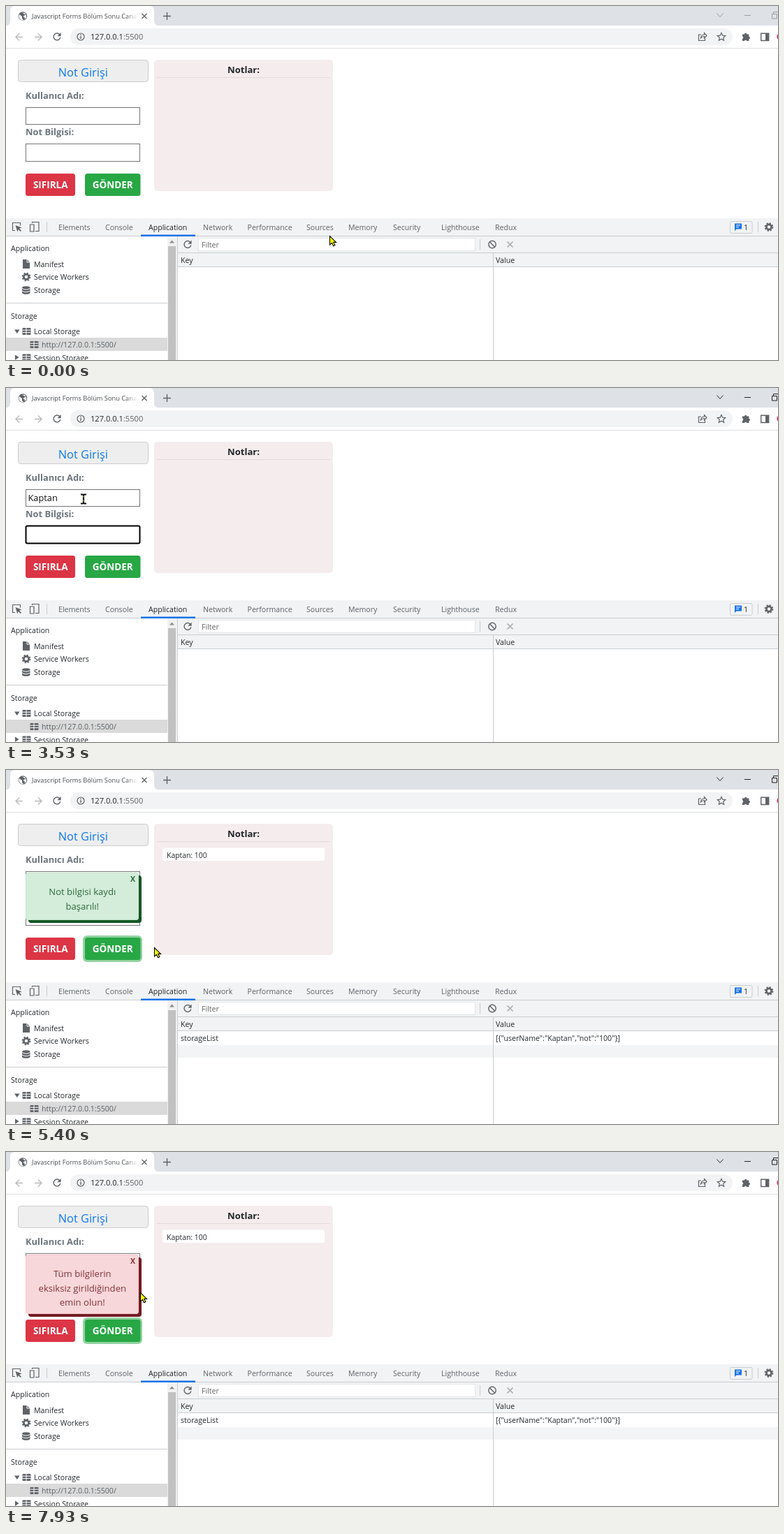
An HTML page that plays this animation: 1105x507 px, repeating every 8000 ms.

```html
<!DOCTYPE html>
<html lang="tr">
<head>
<meta charset="utf-8">
<style>
html, body { margin: 0; width: 100%; height: 100%; overflow: hidden; background: #fff }
svg { display: block; font-family: "Open Sans", "Noto Sans", sans-serif; font-size: 10.6px }
text { fill: #24282c; white-space: pre }
.mid { text-anchor: middle }
.bold { font-weight: 700 }
.label { font-size: 12.9px; fill: #6c757d }
.button { font-size: 13.5px; fill: #fff }
.typed { font-size: 12.8px; fill: #111 }
.line { fill: none; stroke: #5f6368; stroke-width: 1.4 }
.rule { fill: none; stroke: #cacdd1 }
.bar { fill: #f1f3f4 }
.icon { fill: #5f6368 }
.alert text { font-size: 13.1px; fill: inherit; fill-opacity: .88 }
</style>
</head>
<body>
<svg width="1105" height="507" viewBox="0 0 1105 507">
<defs>
  <g id="gear"><circle r="3.6" fill="none" stroke="#5f6368" stroke-width="2.6"/><circle r="5.4" fill="none" stroke="#5f6368" stroke-width="2" stroke-dasharray="2.2 2.04"/></g>
  <g id="reload"><path class="line" stroke-width="1.7" d="M3.6-3.4A4.9 4.9 0 1 0 4.8 1"/><path class="icon" d="M5.6-6v5.2H.4z"/></g>
  <g id="grid" class="icon"><rect width="12" height="10" rx="1"/><path d="M0 3.2h12M0 6.6h12M5.5 0v10" stroke="#fff"/></g>
</defs>

<!-- browser frame -->
<rect width="1105" height="28" fill="#dee1e6"/>
<path d="M0 28.500Q6 28 6 21V7Q6 0 13 0H205Q212 0 212 7V21Q212 28 219 28.500z" fill="#fff"/>
<circle class="icon" cx="24" cy="14.500" r="6.200"/>
<path d="M19 12l4 3v3l2 2-1 .6q-5-1-5.600-6zM23 9.500l4 .5 1.800 3-3 .5-1 2 2.500 1.500-1 2q4-2 2.500-6z" fill="#fff"/>
<linearGradient id="fade" gradientUnits="userSpaceOnUse" x1="172" x2="188" y1="0" y2="0"><stop stop-color="#45494d"/><stop offset="1" stop-color="#45494d" stop-opacity="0"/></linearGradient>
<text x="37" y="18" font-size="9.250" style="fill:url(#fade)">Javascript Forms Bölüm Sonu Canav</text>
<path class="line" stroke="#3c4043" d="M194.500 11l7 7m0-7l-7 7M225 14.500h11m-5.500-5.500v11"/>
<g id="windowKeys" fill="none"><path d="M1017.500 10.500l4.500 5 4.500-5M1057 13.500h9M1096.500 11.500h7v6.500h-7zM1098.500 11v-2.500h8v7"/></g>
<path class="line" style="stroke:#babcbe" d="M24 44.500H14m5-5l-5 5 5 5M41 44.500h10m-5-5l5 5-5 5"/>
<use href="#reload" x="73" y="44"/>
<rect class="bar" x="92" y="32" width="948" height="24" rx="12"/>
<circle class="line" cx="107" cy="44" r="5" style="stroke-width:1.200"/><path class="line" d="M107 43v4m0-6.500v1.400"/>
<text x="121" y="48" font-size="11.100">127.0.0.1<tspan fill="#5f6368">:5500</tspan></text>
<path class="line" style="stroke-width:1.200" d="M995 41h-3.500v8.500h9v-3M994.500 46q.5-5 5-5v-2.500l3.500 4-3.500 3.500v-2.500q-3 0-5 2.500zM1024 38.500l1.700 3.700 4 .4-3 2.700.9 4-3.600-2.100-3.600 2.100.9-4-3-2.700 4-.4z"/>
<path class="icon" d="M1054 40.500h3a1.700 1.700 0 1 1 3.400 0h3v3.400a1.700 1.700 0 1 1 0 3.400v2.700h-3.200a1.700 1.700 0 0 0-3.200 0h-3v-3.200a1.700 1.700 0 0 0 0-3.300z"/>
<path class="line" d="M1080.700 39.200h11v10.300h-11z"/><rect class="icon" x="1087" y="39" width="5" height="11"/>
<circle cx="1109.500" cy="44" r="6" fill="#e8175d"/>
<path d="M0 60.500H1105" stroke="#dcdee1"/>

<!-- page -->
<rect x="17.500" y="77.500" width="186" height="31" rx="4" fill="#eee" stroke="#ccc"/>
<text class="mid" x="110.300" y="100.500" font-size="16.400" font-weight="500" style="fill:#0d78f2">Not Girişi</text>
<rect x="212" y="77" width="256" height="188" rx="5" fill="#f5eced"/>
<text class="mid bold" x="340" y="96" font-size="13.100" style="fill:#212529">Notlar:</text>
<path d="M216 102.500h248" stroke="#e2dadb"/>
<text class="label bold" x="28" y="132.500">Kullanıcı Adı:</text>
<text class="label bold" x="28" y="185">Not Bilgisi:</text>
<g id="fields"></g>
<rect id="ring" x="110" y="237" width="85" height="38" rx="6" fill="#93d3a2"/>
<rect id="reset" x="28" y="240" width="71" height="32" rx="3.500"/>
<rect id="send" x="113" y="240" width="79.500" height="32" rx="3.500"/>
<text class="button mid bold" x="63.700" y="261">SIFIRLA</text>
<text class="button mid bold" x="152.700" y="261">GÖNDER</text>

<!-- developer tools -->
<rect class="bar" y="304" width="1105" height="26"/>
<path class="line" style="stroke-width:1.200" d="M13 321.500h-3.500v-11h11v4M37.500 311v-1.500h9.500v13h-5M34.500 313h5.500v10h-5.500z"/>
<path class="icon" d="M13.500 314l9 3.500-3.500 1.200 3 3-1.300 1.300-3-3-1.300 3.500z"/>
<path class="rule" d="M58.500 309v15M1076.500 309v15M0 329.500H1105"/>
<g id="tabs"></g>
<rect x="193" y="327.500" width="78" height="2.500" fill="#1a73e8"/>
<rect class="rule" x="1036.500" y="308.500" width="31.500" height="17" rx="2"/>
<path d="M1043 311.500h10v8h-7.500l-2.500 2.500z" fill="#1a73e8"/><path d="M1045 314h6m-6 2.700h4" stroke="#fff"/>
<text x="1056" y="320.500">1</text>
<use href="#gear" x="1092" y="316.500"/>
<text x="7" y="351">Application</text>
<path class="icon" d="M24 363h6l4 4v9H24z"/><path d="M30 363v4h4" stroke="#fff" fill="none"/>
<text x="40" y="373.500">Manifest</text>
<use href="#gear" x="29" y="388"/>
<text x="40" y="392">Service Workers</text>
<path class="icon" d="M23 403.500a5.700 2.300 0 0 1 11.500 0v7a5.700 2.300 0 0 1-11.500 0z"/><path d="M23 404.500q5.700 3.500 11.500 0m-11.500 3.500q5.700 3.500 11.500 0" stroke="#fff" fill="none"/>
<text x="40" y="411">Storage</text>
<path class="rule" d="M0 425.500h231"/>
<text x="7" y="447.500">Storage</text>
<rect y="475" width="231" height="19" fill="#dadada"/>
<path class="icon" d="M12 463.500h7.500l-3.700 5.500zM13 499.500v7.500l5.500-3.700z"/>
<use href="#grid" x="23.500" y="461"/><use href="#grid" x="34.500" y="480"/><use href="#grid" x="23.500" y="498.500"/>
<text x="40" y="470">Local Storage</text>
<text x="51" y="488.500" style="fill:#5a5f64">http://127.0.0.1:5500/</text>
<text x="40" y="507.500">Session Storage</text>
<rect x="231" y="330" width="14" height="177" fill="#f1f1f1"/><rect x="232" y="344" width="11" height="163" fill="#c1c1c1"/>
<path d="M234 339.500l3.500-4 3.500 4z" fill="#8b8b8b"/>
<rect class="bar" x="246" y="330" width="859" height="44"/>
<use href="#reload" x="260" y="341.500"/>
<rect x="275.500" y="332.500" width="396" height="18" fill="#fff" stroke="#e3e5e8"/>
<text x="280" y="345.500" style="fill:#666">Filter</text>
<path class="rule" d="M678.500 334v15M245.500 330v177M246 353.500h859M246 373.500h859M697.500 354v153"/>
<circle class="line" cx="696" cy="341.500" r="5.200"/><path class="line" d="M692.500 338l7 7"/>
<path class="line" style="stroke:#aaadb0;stroke-width:1.700" d="M717.500 337.500l8 8m0-8l-8 8"/>
<text x="250" y="368">Key</text><text x="701" y="368">Value</text>
<g id="saved">
  <rect x="224" y="111.500" width="232" height="18.500" rx="3" fill="#fff"/>
  <text x="230" y="125.500" font-size="10.400">Kaptan: 100</text>
  <text x="250" y="388">storageList</text>
  <text x="701" y="388">[{"userName":"Kaptan","not":"100"}]</text>
  <path d="M246 394h451v18H246zM698 394h407v18H698z" fill="#f3f4f5"/>
</g>
<g id="success" class="alert"></g>
<g id="failure" class="alert"></g>
<g id="pointer">
  <path id="arrow" d="M.5.500v12.500l2.900-2.600 2.300 4.300 2.200-1.100-2.200-4.200h3.800z" fill="#ff0" stroke="#000" stroke-width="1.100"/>
  <g id="beam" fill="none"><path d="M-4-6.500h3l1 1 1-1h3M-4 6.500h3l1-1 1 1h3M0-6v12" stroke="#111" stroke-width="2.200"/><path d="M0-4.500v2m0 4v2" stroke="#dd0"/></g>
  <path id="hand" d="M-1.500 8V1.200q0-1.500 1.300-1.500t1.300 1.500V5.500l5 .9q2 .4 2 2.300v3.500l-1.500 3.500h-6.500l-4.300-6q.5-2 2.700-.7z" fill="#ff0" stroke="#000"/>
</g>
</svg>
<script>
const $ = id => document.getElementById(id);
const show = (id, on) => $(id).style.display = on ? "" : "none";

$("tabs").innerHTML = Object.entries({
  Elements: 75, Console: 142, Application: 204, Network: 282, Performance: 345.5, Sources: 430,
  Memory: 490, Security: 554, Lighthouse: 623, Redux: 700
}).map(([name, x]) => `<text x="${x}" y="320.500" style="fill:${name === "Application" ? "#202124" : "#5f6368"}">${name}</text>`).join("");

const fields = [{ top: 145, height: 24 }, { top: 197, height: 25 }];
$("fields").innerHTML = fields.map(({ top, height }, i) => `
  <rect id="box${i}" x="28.500" y="${top + .5}" width="163" height="${height}" fill="#fff"/>
  <text id="text${i}" class="typed" x="31.500" y="${top + 17}"></text>
  <rect id="caret${i}" y="${top + 4}" width="1" height="17"/>`).join("");

function fillAlert(id, lines, height, back, edge, ink) {
  const box = `width="162" height="${height}" rx="4"`;
  $(id).style.fill = ink;
  $(id).innerHTML = `<rect x="32" y="151" ${box}/><rect x="28" y="147" ${box} fill="${back}"/>
    <rect x="28.500" y="147.500" width="161" height="${height - 1}" rx="3.500" fill="none" stroke="${edge}"/>
    <text class="mid bold" x="181.500" y="159.500" style="font-size:10.600px">X</text>` +
    lines.map((s, i) => `<text class="mid" x="109.300" y="${179 + i * 20.5}">${s}</text>`).join("");
}
fillAlert("success", ["Not bilgisi kaydı", "başarılı!"], 68, "#d4edda", "#c3e6cb", "#155724");
fillAlert("failure", ["Tüm bilgilerin", "eksiksiz girildiğinden", "emin olun!"], 85, "#f8d7da", "#f5c6cb", "#721c24");

// time, focused field (-1 for none), user, note
const typing = [
  [0, -1, "", ""], [930, 0, "", ""],
  [2000, 0, "K", ""], [2200, 0, "Ka", ""], [2270, 0, "Kap", ""],
  [2470, 0, "Kapt", ""], [2530, 0, "Kapta", ""], [2670, 0, "Kaptan", ""],
  [3000, 1, "Kaptan", ""], [3600, 1, "Kaptan", "1"], [3730, 1, "Kaptan", "10"], [3800, 1, "Kaptan", "100"],
  [5070, -1, "Kaptan", "100"], [5200, -1, "", ""]
];

// time, x, y
const path = [
  [0, 463, 329], [130, 360, 290], [330, 120, 207], [470, 120, 207], [730, 108, 158], [1070, 108, 158],
  [1200, 111, 159], [4200, 111, 159], [4270, 99, 158], [4400, 99, 158], [4600, 125, 195],
  [4870, 172, 254], [5270, 172, 254], [5400, 212, 254], [5670, 273, 291], [5800, 265, 280],
  [6130, 180, 168], [6330, 185, 154], [6670, 185, 154], [7200, 149, 172], [7330, 148, 180],
  [7470, 153, 252], [7670, 155, 254], [7730, 195, 256], [7800, 229, 240], [7930, 192, 201]
];

function pointAt(t) {
  const i = path.findIndex(p => p[0] > t);
  if (i < 0) return path[path.length - 1].slice(1);
  const [a, b] = [path[i - 1], path[i]], k = (t - a[0]) / (b[0] - a[0]);
  return [1, 2].map(n => Math.round(a[n] + (b[n] - a[n]) * k));
}

function draw(now) {
  const tick = 200 / 3;
  const moment = Math.floor((now % 8000 + 3.4) / tick) * tick;
  const t = Math.round(moment / 10) * 10;
  const during = (from, to = 8000) => t >= from && t < to;

  const [since, focus, ...values] = typing.filter(s => s[0] <= t).pop();
  values.forEach((value, i) => {
    const text = $("text" + i), active = focus === i, box = $("box" + i);
    text.textContent = value;
    box.setAttribute("stroke", active ? "#000" : "#767676");
    box.setAttribute("stroke-width", active ? 2 : 1);
    box.setAttribute("rx", active ? 2 : 0);
    $("caret" + i).setAttribute("x", Math.round(31 + (value ? text.getComputedTextLength() : 0)));
    show("caret" + i, active && (t - since) % 1067 < 530);
  });

  const success = during(5200, 6600), failure = during(7670);
  show("success", success);
  show("failure", failure);
  show("saved", t >= 5200);
  show("ring", during(5070, 6470) || during(7530));
  $("windowKeys").setAttribute("stroke", t < 870 ? "#9a9da1" : "#222");

  const [x, y] = pointAt(t);
  const over = (l, top, r, bottom) => x >= l && x < r && y >= top && y < bottom;
  const onReset = over(28, 240, 99, 272), onSend = over(113, 240, 192, 272);
  const onField = !success && !failure && fields.some(f => over(28, f.top, 192, f.top + f.height));
  $("reset").setAttribute("fill", onReset ? "#c82333" : "#dc3545");
  $("send").setAttribute("fill", onSend ? "#218838" : "#28a745");
  show("hand", onReset || onSend);
  show("beam", onField);
  show("arrow", !onReset && !onSend && !onField);
  $("pointer").setAttribute("transform", `translate(${x} ${y})`);
}

const start = performance.now();
function loop() {
  draw(performance.now() - start);
  requestAnimationFrame(loop);
}
loop();
</script>
</body>
</html>
```
